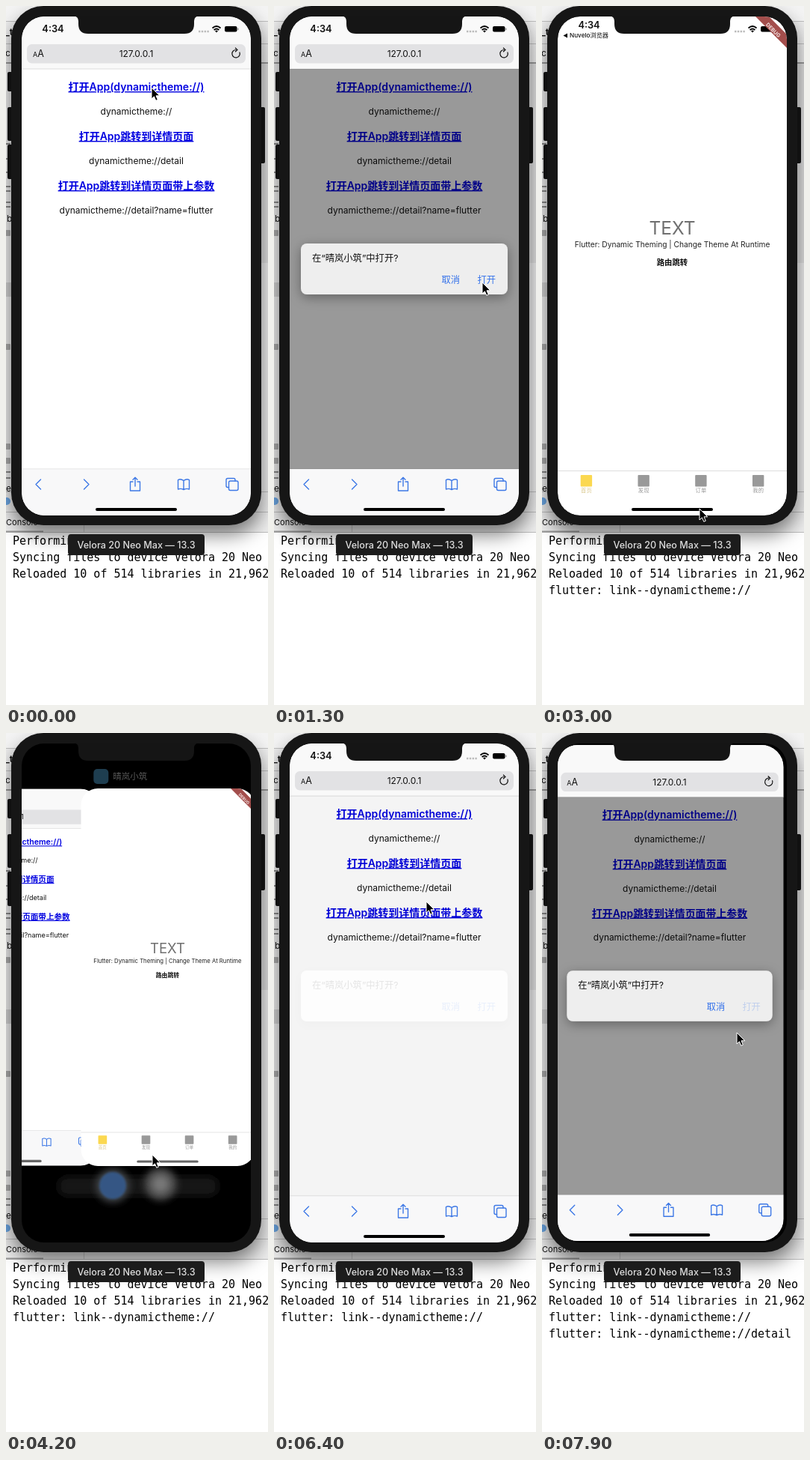
An HTML page for the animation above (8000 ms loop, 351x933 px).

```html
<!DOCTYPE html>
<html lang="zh-CN">
<head>
<meta charset="utf-8">
<style>
html, body { margin: 0; width: 100%; height: 100%; overflow: hidden; background: #fff; }
svg { display: block; width: 100vw; height: 100vh; }
text { font-family: Inter, "Noto Sans CJK SC", "Noto Sans CJK", sans-serif; font-size: 12px; fill: #111; }
.mid { text-anchor: middle; }
.link { font-size: 14px; font-weight: 600; fill: #0000e0; text-decoration: underline; text-anchor: middle; }
.log { font: 15px "DejaVu Sans Mono", monospace; fill: #000; }
.line { fill: none; stroke: #3d78e6; stroke-width: 1.4; stroke-linecap: round; stroke-linejoin: round; }
.act { font-size: 12.3px; fill: #3572ea; }
.tab { font-size: 7.3px; fill: #999; text-anchor: middle; }
.side { font-size: 12px; }
</style>
</head>
<body>
<svg viewBox="0 0 351 933" preserveAspectRatio="none">
<defs>
  <clipPath id="screen"><rect x="21" y="14" width="307" height="666" rx="30"/></clipPath>
  <filter id="blur" x="-60%" y="-60%" width="220%" height="220%"><feGaussianBlur stdDeviation="5"/></filter>
  <filter id="soft" x="-20%" y="-20%" width="140%" height="140%"><feGaussianBlur stdDeviation="1.5"/></filter>
  <filter id="phoneShadow" x="-20%" y="-10%" width="140%" height="120%">
    <feDropShadow dx="0" dy="13" stdDeviation="13" flood-opacity=".5"/>
  </filter>
  <filter id="boxShadow" x="-20%" y="-40%" width="140%" height="200%">
    <feDropShadow dx="0" dy="4" stdDeviation="8" flood-opacity=".35"/>
  </filter>
  <g id="radio">
    <path d="M258 34h14" stroke="#bbb" stroke-width="2.4" stroke-dasharray="2.4 1.4"/>
    <path d="M276.500 29.500Q282 24.500 287.500 29.500M278.600 32Q282 29 285.400 32" fill="none" stroke="#000" stroke-width="1.800"/>
    <path d="M280 33.300Q282 31.800 284 33.300L282 35.500Z"/>
    <rect x="293" y="27" width="16.500" height="7.500" rx="2"/>
    <rect x="310.300" y="29.300" width="1.200" height="3" rx=".6" fill="#888"/>
  </g>
</defs>

<!-- desktop behind the phone -->
<g>
  <rect width="351" height="702" fill="#ececec"/>
  <rect width="351" height="20" fill="#f4f4f4"/>
  <path d="M0 20.500H351M0 50.500H351M0 648.500H351M0 675.500H351M0 702.500H351" stroke="#bdbdbd"/>
  <rect x="342" y="77" width="9" height="266" fill="#dedede"/>
  <path d="M0 76H351" stroke="#999" stroke-width="2"/>
  <rect y="369" width="20" height="19" fill="#d0d0d0"/>
  <g fill="#aaa">
    <rect x="-3" y="299" width="9" height="8" rx="1"/><rect x="-3" y="451" width="9" height="8" rx="1"/>
    <rect x="-3" y="584" width="9" height="8" rx="1"/><rect x="-3" y="603" width="9" height="8" rx="1"/>
  </g>
  <path d="M0 184H6M0 204H6M0 222H6M0 241H6M0 247H6M0 262H6M0 268H6M0 622H6M0 630H6" stroke="#888" stroke-width="2"/>
  <text class="side" x="-1" y="39" font-weight="700">_t</text>
  <text class="side" x="-1" y="67">c</text>
  <text class="side" x="-2" y="288">ib</text>
  <text class="side" x="0" y="648">e</text>
  <circle cx="1" cy="661" r="5" fill="#6aa5e2"/>
  <text x="0" y="693" font-size="11" style="font-size:11px">Console</text>
  <path d="M0 701.500H50" stroke="#999" stroke-width="2"/>
  <path d="M104.500 676V702" stroke="#c8c8c8"/>
  <rect y="703" width="351" height="230" fill="#fff"/>
</g>

<!-- phone body -->
<g fill="#151515">
  <rect x="2" y="88" width="8" height="26" rx="2"/><rect x="2" y="135" width="8" height="45" rx="2"/>
  <rect x="2" y="185" width="8" height="46" rx="2"/><rect x="339" y="135" width="8" height="75" rx="2"/>
  <rect x="7" y="0" width="335" height="693" rx="43" filter="url(#phoneShadow)"/>
</g>
<g>
  <text class="log" x="9" y="719">Performing hot reload...</text>
  <text class="log" x="9" y="741">Syncing files to device Velora 20 Neo Max...</text>
  <text class="log" x="9" y="763">Reloaded 10 of 514 libraries in 21,962ms.</text>
  <text class="log" x="9" y="785" id="log1">flutter: link--dynamictheme://</text>
  <text class="log" x="9" y="807" id="log2">flutter: link--dynamictheme://detail</text>
</g>

<g clip-path="url(#screen)">
  <rect x="21" y="14" width="307" height="666" fill="#000"/>
  <g id="home">
    <g id="dock">
      <rect x="70" y="592" width="214" height="26" rx="12" fill="#161616" filter="url(#blur)"/>
      <circle cx="143" cy="604" r="23" fill="#3c3f42" filter="url(#blur)"/>
      <circle cx="143" cy="604" r="18" fill="#365784" filter="url(#soft)"/>
      <circle cx="207" cy="602" r="22" fill="#4a4a4a" filter="url(#blur)"/>
      <circle cx="207" cy="602" r="12" fill="#777" filter="url(#blur)"/>
    </g>
    <g id="icons" filter="url(#blur)" fill="#4c4c4c">
      <circle cx="72" cy="107" r="19"/><circle cx="72" cy="107" r="13" fill="#34568a"/>
      <circle cx="72" cy="190" r="20"/><circle cx="72" cy="267" r="20"/><circle cx="72" cy="349" r="20"/>
    </g>
  </g>

  <!-- browser -->
  <g id="web"><g clip-path="url(#screen)">
    <rect x="21" y="14" width="307" height="666" fill="#fff"/>
    <rect x="21" y="14" width="307" height="70" fill="#f9f9f9"/>
    <path d="M21 84H328M21 618H328" stroke="#d5d5d5" stroke-width=".8"/>
    <rect x="28" y="51" width="293" height="25.500" rx="6.500" fill="#e2e2e4"/>
    <text x="36" y="68"><tspan style="font-size:9px">A</tspan><tspan style="font-size:12.500px">A</tspan></text>
    <text class="mid" x="174.500" y="68">127.0.0.1</text>
    <path d="M312.800 61.500A5.200 5.200 0 1 1 308.500 58.500M307 55.700L310 58.500L307 61.300" fill="none" stroke="#111" stroke-width="1.200"/>
    <text class="link" x="174.500" y="113">打开App(dynamictheme://)</text>
    <text class="mid" x="174.500" y="145">dynamictheme://</text>
    <text class="link" x="174.500" y="179">打开App跳转到详情页面</text>
    <text class="mid" x="174.500" y="211">dynamictheme://detail</text>
    <text class="link" x="174.500" y="245">打开App跳转到详情页面带上参数</text>
    <text class="mid" x="174.500" y="277">dynamictheme://detail?name=flutter</text>
    <g id="dialog">
      <rect x="21" y="84" width="307" height="534" opacity=".4"/>
      <rect x="36" y="317" width="277" height="68" rx="8" fill="#eee" filter="url(#boxShadow)"/>
      <text x="51" y="341" style="font-size:12.300px">在“晴岚小筑”中打开?</text>
      <text class="act" x="224.500" y="370">取消</text>
      <text class="act" x="272.500" y="370" id="open">打开</text>
    </g>
    <rect x="21" y="618.500" width="307" height="62" fill="#f8f8f9"/>
    <g class="line">
      <path d="M46.500 632L40 638.500L46.500 645M104.500 632L111 638.500L104.500 645"/>
      <path d="M170 635H166.500V647H179.500V635H176M173 641V629.500M170 632.300L173 629.300L176 632.300"/>
      <path d="M238 633.500Q234 630.500 230.500 632.500V645Q234 643.500 238 645.500Q242 643.500 245.500 645V632.500Q242 630.500 238 633.500V645.500"/>
      <rect x="298.500" y="634" width="12.500" height="12.500" rx="2"/>
      <path d="M298.500 642.500H297Q295 642.500 295 640.500V632.500Q295 630.500 297 630.500H305Q307 630.500 307 632.500V634"/>
    </g>
    <rect class="bar" x="120" y="670" width="109" height="4" rx="2"/>
    <g id="webStatus">
      <text class="mid" x="63" y="35" font-weight="600" style="font-size:12.800px">4:34</text>
      <use href="#radio"/>
    </g>
    <rect id="shade" x="21" y="14" width="307" height="666"/>
  </g></g>
  <g id="webHead">
    <rect x="-10" y="-10" width="20" height="20" rx="5" fill="#eee"/>
    <circle r="8" fill="#3478e0"/>
    <text x="15" y="4.500" style="fill:#fff">Nuvelo浏览器</text>
  </g>

  <!-- themed app -->
  <g id="app"><g clip-path="url(#screen)">
    <rect x="21" y="14" width="307" height="666" fill="#fff"/>
    <text class="mid" x="174.500" y="305" style="font-size:24.500px;fill:#707070">TEXT</text>
    <text class="mid" x="174.500" y="322" style="font-size:10.200px;fill:#222">Flutter: Dynamic Theming | Change Theme At Runtime</text>
    <text class="mid" x="174.500" y="346.500" font-weight="700" style="font-size:10.400px">路由跳转</text>
    <path d="M21 620.500H328" stroke="#ddd"/>
    <g id="tabs"></g>
    <rect class="bar" x="120" y="670" width="109" height="4" rx="2"/>
    <g id="appStatus">
      <text class="mid" x="63" y="30" font-weight="600" style="font-size:12.800px">4:34</text>
      <path d="M34 36.500V42.500L28.500 39.500Z"/>
      <text x="37" y="42.500" font-weight="500" style="font-size:8.200px">Nuvelo浏览器</text>
      <use href="#radio"/>
    </g>
    <path d="M286 14H304L328 38V56Z" fill="#a34e4c"/>
    <text class="mid" transform="translate(309.500 32.500) rotate(45)" y="2" font-weight="700" style="font-size:7px;fill:#f4e4e4">DEBUG</text>
  </g></g>
  <g id="appHead">
    <rect x="-10" y="-10" width="20" height="20" rx="5" fill="#58b1e6"/>
    <text x="16" y="4.500" style="fill:#fff;font-size:11.500px">晴岚小筑</text>
  </g>
</g>

<path d="M90 13Q97 14 97 20V24Q97 37 110 37H239Q252 37 252 24V20Q252 14 259 13Z" fill="#151515"/>
<rect x="83" y="705" width="183" height="28" rx="4" fill="#1c1c1c"/>
<text class="mid" x="174.500" y="724" font-weight="500" style="font-size:12.600px;fill:#ddd">Velora 20 Neo Max — 13.3</text>
<path id="cursor" d="M0 0V15L3.400 11.800L5.800 17.300L8.300 16.200L6 10.800H10.800Z" stroke="#fff" stroke-width="1"/>
</svg>

<script>
const LOOP = 8000;
const $ = id => document.getElementById(id);
const bars = document.querySelectorAll('.bar');

$('tabs').innerHTML = ['首页', '发现', '订单', '我的'].map((name, i) => {
  const x = 59.4 + i * 76.75, fill = i ? '#999' : '#fbd850';
  return `<rect x="${x - 7.7}" y="626" width="15.4" height="15.4" rx="1" fill="${fill}"/>
    <text class="tab" x="${x}" y="649.5" ${i ? '' : 'style="fill:#d8c68a"'}>${name}</text>`;
}).join('');

// Keys are [time, ...values]; each step eases into the next.
function at(keys, t) {
  const i = keys.findIndex(k => k[0] > t);
  if (i === 0) return keys[0].slice(1);
  if (i < 0) return keys[keys.length - 1].slice(1);
  const a = keys[i - 1], b = keys[i];
  const u = (t - a[0]) / (b[0] - a[0]), e = u * u * (3 - 2 * u);
  return a.slice(1).map((v, k) => v + (b[k + 1] - v) * e);
}

// Card centre x, centre y and scale
const webKeys = [
  [1700, 174.5, 347, 1], [2250, -160, 347, .92], [3000, -160, 347, 1],
  [4200, 6.5, 326, .755], [4400, 6.5, 326, .755], [4700, 175, 340, .685],
  [5300, 175, 340, .685], [5700, 174.5, 347, 1], [7840, 174.5, 347, 1],
  [7900, 171, 347, .994], [8400, -160, 347, .92]];
const appKeys = [
  [1700, 510, 347, .94], [2250, 174.5, 347, 1], [3000, 174.5, 347, 1],
  [4200, 216.5, 326, .757], [4400, 216.5, 326, .757], [4700, 296.5, 340, .694],
  [5300, 296.5, 340, .694], [5700, 530, 347, 1]];
const cursorKeys = [
  [300, 195, 109], [1100, 279, 369], [1600, 279, 369], [2700, 211, 671],
  [3050, 211, 671], [4200, 196, 563], [4400, 196, 563], [5100, 157, 424],
  [5400, 157, 424], [6100, 206, 174], [6250, 206, 174], [6400, 204, 225],
  [7200, 279, 369], [7700, 279, 369], [7900, 261, 400]];
const dialogKeys = [[300, 0], [600, 1], [2299, 1], [2300, 0], [6340, 0], [6640, 1]];
const homeKeys = [[3100, 0], [3900, 1], [5300, 1], [5600, 0]];
const dockKeys = [[4400, 0, 0], [4700, -2, 15]];
const iconKeys = [[4400, 0], [4700, 1]];
const appHeadKeys = [[3700, 0], [4200, .35], [4400, .35], [4700, 1], [5300, 1], [5500, 0]];
const webHeadKeys = [[4400, 0], [4900, .7], [5300, .7], [5500, 0]];
const shadeKeys = [[4400, 0], [4700, .05], [5300, .05], [5700, 0]];

const move = (id, x, y) => $(id).setAttribute('transform', `translate(${x} ${y})`);
const fade = (id, v) => $(id).setAttribute('opacity', +v);

function place(id, keys, t) {
  const [x, y, s] = at(keys, t);
  $(id).setAttribute('transform', `translate(${x} ${y}) scale(${s}) translate(-174.5 -347)`);
  move(id + 'Head', x - 153.5 * s + 27, y - 333 * s - 16);
}

function draw(t) {
  place('web', webKeys, t);
  place('app', appKeys, t);
  move('cursor', ...at(cursorKeys, t));
  move('dock', ...at(dockKeys, t));
  fade('home', at(homeKeys, t)[0]);
  fade('icons', at(iconKeys, t)[0]);
  fade('dialog', at(dialogKeys, t)[0]);
  fade('webHead', at(webHeadKeys, t)[0]);
  fade('appHead', at(appHeadKeys, t)[0]);
  fade('shade', at(shadeKeys, t)[0]);
  fade('open', t > 7650 || t > 1450 && t < 2300 ? .25 : 1);
  fade('webStatus', t < 1700 || t >= 5700 && t < 7850);
  fade('appStatus', t >= 2250 && t < 3050);
  fade('log1', t >= 1900);
  fade('log2', t >= 7800);
  for (const bar of bars) {
    bar.setAttribute('opacity', t < 4400 || t >= 5700 ? 1 : 0);
    bar.setAttribute('fill', t > 3100 && t < 4400 ? '#666' : '#000');
  }
}

const start = performance.now();
function tick() {
  draw((performance.now() - start) % LOOP);
  requestAnimationFrame(tick);
}
tick();
</script>
</body>
</html>
```
